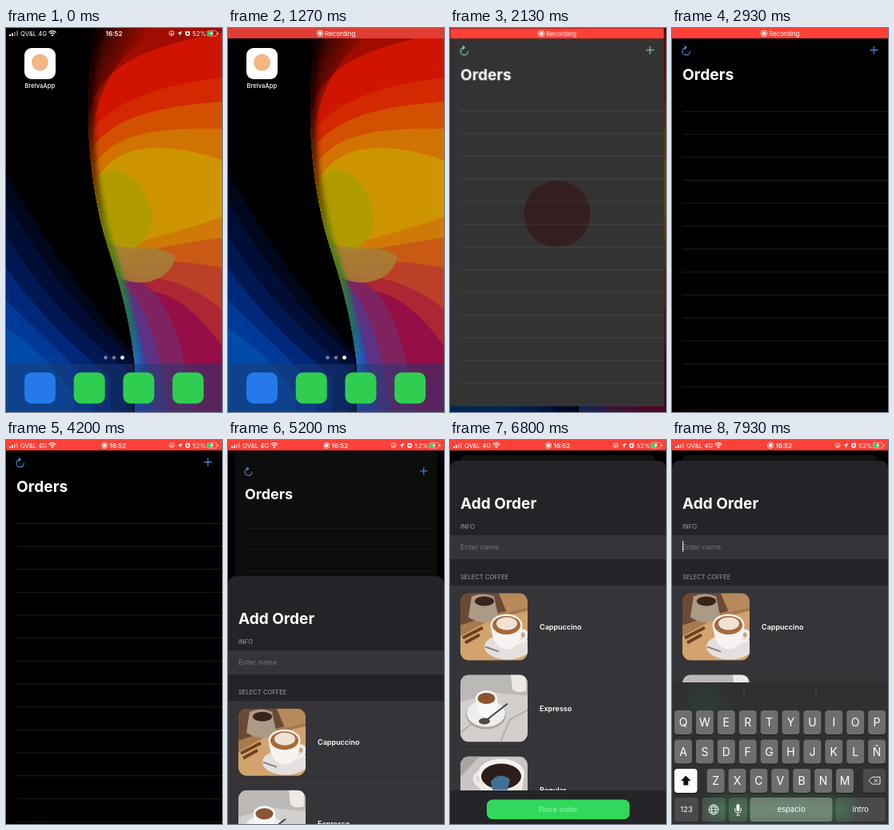
Recreate the animation shown at these times as an HTML page. Size 270 by 480 pixels, loop 8000 ms.

```html
<!DOCTYPE html>
<html lang="en">
<head>
<meta charset="utf-8">
<title>Coffee orders</title>
<style>
  :root {
    --spring: linear(0, .09 5%, .264 10%, .442 15%, .594 20%, .713 25%, .801 30%, .864 35%,
      .908 40%, .96 50%, .983 60%, .9927 70%, .997 80%, 1);
  }
  html, body { margin: 0; width: 100%; height: 100%; overflow: hidden; background: #000; }
  #stage { position: relative; width: 270px; height: 480px; overflow: hidden; }
  .layer { position: absolute; left: 0; top: 0; width: 270px; height: 480px; transform-origin: 0 0; }
  svg { display: block; overflow: visible; font-family: Inter, Roboto, sans-serif; }

  .wallpaper { animation: dim 8s linear infinite; }
  .springboard { transform-origin: 50% 50%; animation: leave 8s linear infinite; }
  .plain { animation: plain 8s linear infinite; }
  .homebar { animation: homebar 8s linear infinite; }
  .window { background: #000; overflow: hidden;
    animation: zoom 8s var(--spring) infinite, show 8s linear infinite; }
  .card { background: #000; overflow: hidden; animation: recede 8s var(--spring) infinite; }
  .tint { animation: tint 8s linear infinite; }
  .launch { animation: launch 8s linear infinite; }
  .sheet { animation: rise 8s var(--spring) infinite; }
  .keyboard { animation: keys 8s var(--spring) infinite; }
  .caret { animation: caret 8s step-end infinite; }
  .recording { animation: recording 8s linear infinite; }
  .carrier { animation: carrier 8s linear infinite; }

  @keyframes dim { 0%, 22% { filter: brightness(1); } 26%, 100% { filter: brightness(.5); } }
  @keyframes leave {
    0%, 22% { opacity: 1; transform: none; }
    25%, 100% { opacity: 0; transform: scale(1.25); }
  }
  @keyframes plain { 0%, 5.5% { opacity: 1; } 8.5%, 100% { opacity: 0; } }
  @keyframes homebar {
    0%, 5.5% { opacity: 0; } 8.5%, 24% { opacity: 1; } 26%, 100% { opacity: 0; }
  }
  @keyframes show { 0%, 22.2% { opacity: 0; } 23%, 100% { opacity: 1; } }
  @keyframes zoom {
    0%, 22.2% { transform: translate(23px, 25px) scale(.1444); clip-path: inset(0 0 210px 0 round 60px); }
    29.05%, 100% { transform: none; clip-path: inset(0 0 0 0 round 0px); }
  }
  @keyframes tint { 0%, 27% { stroke: #7fd0d4; } 29%, 100% { stroke: #4f94e8; } }
  @keyframes launch { 0%, 24.4% { opacity: 1; } 27.2%, 100% { opacity: 0; } }
  @keyframes recording { 0%, 37% { opacity: 1; } 39%, 100% { opacity: 0; } }
  @keyframes carrier { 0%, 37% { opacity: 0; } 39%, 100% { opacity: 1; } }
  @keyframes recede {
    0%, 63.4% { transform: none; border-radius: 0; background: #000; }
    70.2%, 100% { transform: translate(13px, 19px) scale(.904); border-radius: 8px; background: #131314; }
  }
  @keyframes rise { 0%, 63.4% { transform: translateY(454px); } 70.2%, 100% { transform: none; } }
  @keyframes keys { 0%, 90.8% { transform: translateY(177px); } 97.6%, 100% { transform: none; } }
  @keyframes caret { 0%, 90.8% { opacity: 0; } 91%, 100% { opacity: 1; } }
</style>
</head>
<body>
<div id="stage">
  <svg class="layer wallpaper" viewBox="0 0 270 480">
    <defs>
      <clipPath id="petal">
        <path d="M112 0C105 30 103 75 103 110C103 160 112 220 124 262C132 290 153 345 161 420V480H270V0Z"/>
      </clipPath>
      <filter id="soft" x="-50%" width="200%"><feGaussianBlur stdDeviation="3"/></filter>
      <filter id="blur"><feGaussianBlur stdDeviation="9"/></filter>
      <linearGradient id="edge" x1="0" x2="0" y1="0" y2="1">
        <stop offset="0" stop-color="#0c0000"/><stop offset=".2" stop-color="#2c0300"/>
        <stop offset=".38" stop-color="#6e3000"/><stop offset=".52" stop-color="#5f7a08"/>
        <stop offset=".66" stop-color="#2c8428"/><stop offset=".78" stop-color="#1a6f60"/>
        <stop offset=".88" stop-color="#1470cc"/><stop offset="1" stop-color="#0b58c0"/>
      </linearGradient>
      <linearGradient id="shade" x1="0" x2=".6" y1="0" y2=".35">
        <stop offset="0" stop-color="#000"/><stop offset=".25" stop-color="#000" stop-opacity=".75"/>
        <stop offset="1" stop-color="#000" stop-opacity="0"/>
      </linearGradient>
    </defs>
    <path fill="#000" d="M0 0H270V480H0Z"/>
    <path fill="#00071a" d="M0 180C45 260 100 340 158 405V480H0Z"/>
    <path fill="#000d34" d="M0 215C45 295 100 365 158 412V480H0Z"/>
    <path fill="#001852" d="M0 260C40 325 95 385 150 425V480H0Z"/>
    <path fill="#00287a" d="M0 300C40 355 85 400 130 435V480H0Z"/>
    <path fill="#003a98" d="M0 340C35 375 75 410 110 450V480H0Z"/>
    <path fill="#004aa8" d="M0 375C30 395 60 420 85 460V480H0Z"/>
    <g clip-path="url(#petal)">
      <path fill="#a00c00" d="M90 0H270V480H90Z"/>
      <path fill="#cf1500" d="M100 110C120 50 160 26 270 6V480H100Z"/>
      <path fill="#d42800" d="M100 140C125 92 190 72 270 62V480H100Z"/>
      <path fill="#d35000" d="M100 160C130 110 190 98 270 92V480H100Z"/>
      <path fill="#d17300" d="M104 180C130 130 190 124 270 126V480H104Z"/>
      <path fill="#cd9500" d="M108 200C130 145 190 138 270 165V480H108Z"/>
      <path fill="#cf7a08" d="M135 275C180 264 230 250 270 236V480H135Z"/>
      <path fill="#c95a14" d="M130 288C180 275 230 268 270 262V480H130Z"/>
      <path fill="#bc4028" d="M130 298C185 288 235 292 270 300V480H130Z"/>
      <path fill="#ac2634" d="M140 312C190 304 240 325 270 352V480H140Z"/>
      <path fill="#960e46" d="M150 330C200 318 240 355 270 398V480H150Z"/>
      <path fill="#7f2360" d="M140 312C185 310 215 350 235 480H155Z"/>
      <path fill="#5c3284" d="M138 312C172 335 192 390 202 480H155Z"/>
      <path fill="#3547a5" d="M138 318C165 355 177 420 185 480H155Z"/>
      <path fill="#b09c00" d="M116 186C138 164 174 190 182 230C186 256 168 276 148 280C128 268 114 224 116 186Z"/>
      <path fill="#a58038" opacity=".85" d="M128 268C158 282 185 266 212 286C205 316 168 326 142 312Z"/>
      <path fill="url(#shade)" d="M100 0H200C150 22 122 55 108 125H100Z"/>
      <path fill="none" stroke="url(#edge)" stroke-width="13" filter="url(#soft)"
        d="M114 0C106 30 103 75 103 110C103 160 112 220 124 262C132 290 153 345 161 420V480"/>
    </g>
  </svg>

  <svg class="layer springboard" viewBox="0 0 270 480">
    <path fill="#1c3a72" opacity=".5" d="M0 420H270V480H0Z"/>
    <rect x="23" y="25" width="39" height="39" rx="9" fill="#fff"/>
    <circle cx="42.5" cy="43" r="10.5" fill="#f4b683"/>
    <text x="42.3" y="74.5" font-size="7.6" font-weight="500" fill="#fff" text-anchor="middle">BrelvaApp</text>
    <g fill="#fff">
      <circle cx="124.5" cy="412" r="2.3" opacity=".45"/>
      <circle cx="135" cy="412" r="2.3" opacity=".45"/>
      <circle cx="145.5" cy="412" r="2.4"/>
    </g>
    <g id="dock"></g>
  </svg>

  <svg class="layer plain" viewBox="0 0 270 480">
    <use href="#status"/>
    <text x="135" y="10" font-size="8" font-weight="600" fill="#fff" text-anchor="middle">16:52</text>
  </svg>
  <svg class="layer homebar" viewBox="0 0 270 480">
    <path fill="#e03d34" d="M0 0H270V13H0Z"/><use href="#recording"/>
  </svg>

  <div class="layer window">
    <div class="layer card">
      <svg viewBox="0 0 270 480">
        <g id="lines" stroke="#1c1c1e"></g>
        <g class="tint" fill="none" stroke-width="1.1" stroke-linecap="round" stroke-linejoin="round">
          <path d="M17 24.4A4.7 4.7 0 1 0 22.4 29M15.8 22.3L18.2 24.4L15.8 26.6"/>
          <path d="M247.8 27.6H257M252.4 23V32.2"/>
        </g>
        <text x="13" y="65.3" font-size="19.2" font-weight="700" fill="#fff">Orders</text>
      </svg>
    </div>

    <svg class="layer launch" viewBox="0 0 270 480">
      <path fill="#fff" d="M0 0H270V480H0Z"/>
      <circle cx="135" cy="234.5" r="42" fill="#ff9a9a"/>
    </svg>

    <svg class="layer sheet" viewBox="0 0 270 480">
      <rect y="26" width="270" height="480" rx="9" fill="#242327"/>
      <path fill="#353438" d="M0 119H270V149H0ZM0 182H270V480H0Z"/>
      <text x="13" y="86" font-size="19" font-weight="700" fill="#fff">Add Order</text>
      <g font-size="7.6" fill="#a09fa5"><text x="13" y="111">INFO</text><text x="13" y="174">SELECT COFFEE</text></g>
      <text x="13" y="136.7" font-size="9" fill="#747378">Enter name</text>
      <path class="caret" fill="#d0d0d4" d="M13 126H14.2V140H13Z"/>
      <g id="menu"></g>
      <path fill="#242327" d="M0 438H270V510H0Z"/>
      <rect x="46" y="449.5" width="178.5" height="24.5" rx="7" fill="#30d95c"/>
      <text x="135" y="465" font-size="9" fill="#a0efb5" text-anchor="middle">Place order</text>
    </svg>

    <svg class="layer keyboard" viewBox="0 0 270 480">
      <path fill="#303032" d="M0 303H270V480H0Z"/>
      <g fill="#30d158" filter="url(#blur)">
        <path opacity=".28" d="M46 449H224V474H46Z"/><circle cx="42" cy="330" r="22" opacity=".08"/>
      </g>
      <path stroke="#48484a" d="M90 310V326M180 310V326"/>
      <g id="keys" fill="#fff" text-anchor="middle"></g>
      <path fill="#111" d="M17.3 419.5L23.5 426H20.3V431.5H14.3V426H11.1Z"/>
      <g fill="none" stroke="#fff" stroke-width=".9">
        <path d="M246 425.7L250 421.3H260V430.1H250ZM252.8 423.6L257 427.8M257 423.6L252.8 427.8"/>
        <circle cx="52" cy="462" r="6"/><ellipse cx="52" cy="462" rx="2.8" ry="6"/>
        <path d="M46 462H58M47 458.8H57M47 465.2H57"/>
        <path d="M78.5 460V462A4 4 0 0 0 86.5 462V460M82.5 466V469M80 469H85"/>
      </g>
      <rect x="80.5" y="455" width="4" height="9" rx="2" fill="#fff"/>
    </svg>

    <svg class="layer" viewBox="0 0 270 480">
      <path fill="#ff4037" d="M0 0H270V13H0Z"/>
      <g class="recording"><use href="#recording"/></g>
      <g class="carrier">
        <use href="#status"/>
        <circle cx="123" cy="6.8" r="3.7" fill="none" stroke="#fff" stroke-width=".8"/>
        <circle cx="123" cy="6.8" r="2.3" fill="#fff"/>
        <text x="129.3" y="9.8" font-size="8" font-weight="600" fill="#fff">16:52</text>
      </g>
    </svg>
  </div>

  <svg width="0" height="0" style="position:absolute">
    <defs>
      <g id="recording" fill="#fff">
        <circle cx="115" cy="6.8" r="3.8" fill="none" stroke="#fff" stroke-width=".8"/>
        <circle cx="115" cy="6.8" r="2.3"/>
        <text x="121" y="9.8" font-size="8">Recording</text>
      </g>
      <g id="status" fill="#fff" font-size="7.8">
        <path d="M4 8H6V10H4ZM7 6.6H9V10H7Z"/>
        <path opacity=".4" d="M10 5H12V10H10ZM13 3.4H15V10H13Z"/>
        <text x="18" y="9.8">QV&amp;L 4G</text>
        <path d="M58 10.4L56.5 8.7Q58 7.4 59.5 8.7Z"/>
        <path fill="none" stroke="#fff" stroke-width="1.2" d="M55.2 7.3Q58 5 60.8 7.3M53.4 5.5Q58 1.8 62.6 5.5"/>
        <g fill="none" stroke="#fff" stroke-width=".8">
          <circle cx="207" cy="6.7" r="3"/>
          <circle cx="227" cy="7" r="2.2" stroke-width="1.5"/>
          <path d="M224 4.8L225.4 3.6M230 4.8L228.6 3.6"/>
          <rect x="251" y="3.3" width="12.4" height="6.8" rx="2" opacity=".6"/>
        </g>
        <path d="M205.8 6.3H208.2V8.3H205.8ZM214 7L220.3 3.7L217.3 10L216.9 7.1ZM264.3 5.5H265.4V8H264.3Z"/>
        <text x="233" y="9.8">52%</text>
        <rect x="252" y="4.3" width="6" height="4.8" rx="1" fill="#3bd15f"/>
        <path d="M258.8 2.8L255.3 7.2H257.2L256 10.6L259.7 6.1H257.7Z"/>
      </g>
      <clipPath id="photo"><rect width="84" height="84" rx="11"/></clipPath>
      <g id="cappuccino" clip-path="url(#photo)">
        <path fill="#a8794c" d="M0 0H84V84H0Z"/><path fill="#d2a36d" d="M0 54L36 34L84 22V84H0Z"/>
        <path fill="#6b4a35" d="M0 0H84V16L50 24L0 40Z"/>
        <path fill="#ab9a86" d="M14 4Q28 -2 42 4L48 32Q28 42 10 30Z"/><ellipse cx="30" cy="10" rx="12" ry="6" fill="#38241b"/>
        <path fill="#b7895b" d="M48 0H84V18L58 24Z"/>
        <path stroke="#71401f" stroke-width="4" d="M3 56L28 43M6 62L24 52"/>
        <ellipse cx="59" cy="67" rx="29" ry="16" fill="#e4e0df"/>
        <path fill="none" stroke="#f3f0ee" stroke-width="4" d="M75 47Q86 46 81 57Q78 62 71 61"/>
        <path fill="#f6f3f1" d="M38 40H77Q77 70 57 70Q40 68 38 40Z"/>
        <ellipse cx="57.5" cy="40" rx="20" ry="14" fill="#f6f3f1"/><ellipse cx="57.5" cy="40" rx="17.5" ry="11.5" fill="#a9683a"/>
        <ellipse cx="58" cy="38" rx="13" ry="8" fill="#f1e3d4"/>
        <path stroke="#8d8782" stroke-width="2" d="M31 67L48 73"/>
      </g>
      <g id="expresso" clip-path="url(#photo)">
        <path fill="#d2cfcd" d="M0 0H84V84H0Z"/><path fill="#bcb8b6" d="M0 0H84V26L40 22L0 34Z"/>
        <path fill="none" stroke="#b5b0ae" stroke-width="2" d="M50 84L62 56L84 44M0 72L16 60"/>
        <path fill="#ece9e7" d="M63 0H82V20Q72 24 65 18Z"/>
        <ellipse cx="32" cy="50" rx="25" ry="18" fill="#aaa5a2"/><ellipse cx="32" cy="48" rx="24" ry="17" fill="#f0eeec"/>
        <path fill="#faf8f6" d="M19 29H46Q46 52 33 53Q20 51 19 29Z"/>
        <ellipse cx="32.5" cy="29" rx="13.5" ry="9.5" fill="#faf8f6"/><ellipse cx="32.5" cy="29.5" rx="11" ry="7" fill="#8b5531"/>
        <path stroke="#45403e" stroke-width="2" d="M32 57L59 36"/><ellipse cx="30" cy="58" rx="7" ry="4" fill="#4c4744"/>
      </g>
      <g id="regular" clip-path="url(#photo)">
        <path fill="#c8c5c4" d="M0 0H84V84H0Z"/><path fill="#aaa5a2" d="M0 0H24L0 26Z"/>
        <path fill="none" stroke="#ece9e7" stroke-width="5" d="M25 38Q12 26 24 20"/>
        <path fill="#eeebe9" d="M22 22H80L72 76H30Z"/><ellipse cx="51" cy="22" rx="29" ry="19" fill="#f3f1ef"/>
        <ellipse cx="51" cy="25" rx="25" ry="16" fill="#2b1d19"/><path fill="#426f96" d="M38 31Q49 18 62 29L59 42H40Z"/>
      </g>
    </defs>
  </svg>
</div>

<script>
  const fill = (id, markup) => document.getElementById(id).innerHTML = markup;
  const box = (x, y, w, h, r, color) =>
    `<rect x="${x}" y="${y}" width="${w}" height="${h}" rx="${r}" fill="${color}"/>`;

  fill('dock', ['#2478ea', '#2fce50', '#2fce50', '#2fce50']
    .map((color, i) => box(23 + 61.7 * i, 430.5, 39, 39, 9, color)).join(''));

  fill('lines', Array.from({ length: 14 }, (_, i) =>
    `<path d="M13 ${104.3 + 28.68 * i}H270"/>`).join(''));

  fill('menu', ['Cappuccino', 'Expresso', 'Regular'].map((name, i) => {
    const y = 191.5 + 102 * i;
    return `<use href="#${name.toLowerCase()}" transform="translate(13 ${y})"/>
      <text x="112" y="${y + 45}" font-size="9" font-weight="600" fill="#fff">${name}</text>
      <path stroke="#454448" stroke-width=".6" d="M13 ${y + 93}H270"/>`;
  }).join(''));

  const LIGHT = 'rgba(255,255,255,.3)', DARK = 'rgba(255,255,255,.13)';
  const key = (x, y, w, label, color, size) =>
    box(x, y + 1, w, 30, 4, '#1b1b1c') + box(x, y, w, 30, 4, '#303032') + box(x, y, w, 30, 4, color) +
    `<text x="${x + w / 2}" y="${y + 15 + size * .37}" font-size="${size}">${label}</text>`;
  const letters = (row, x, y) =>
    [...row].map((c, i) => key(x + 26.9 * i, y, 22, c, LIGHT, 14)).join('');
  const tinted = (x, w, label, color) =>
    box(x, 447, w, 30, 4, color) +
    `<text x="${x + w / 2}" y="465" font-size="9.5">${label}</text>`;

  fill('keys',
    letters('QWERTYUIOP', 3, 338) + letters('ASDFGHJKLÑ', 3, 374.5) + letters('ZXCVBNM', 43.6, 411) +
    key(3, 411, 28.5, '', '#fff', 9) + key(238.5, 411, 28.5, '', DARK, 9) +
    tinted(3, 30, '123', DARK) + tinted(37.5, 29, '', DARK) + tinted(71, 23, '', DARK) +
    tinted(97.5, 103, 'espacio', LIGHT) + tinted(204.5, 62.5, 'intro', DARK));
</script>
</body>
</html>
```
